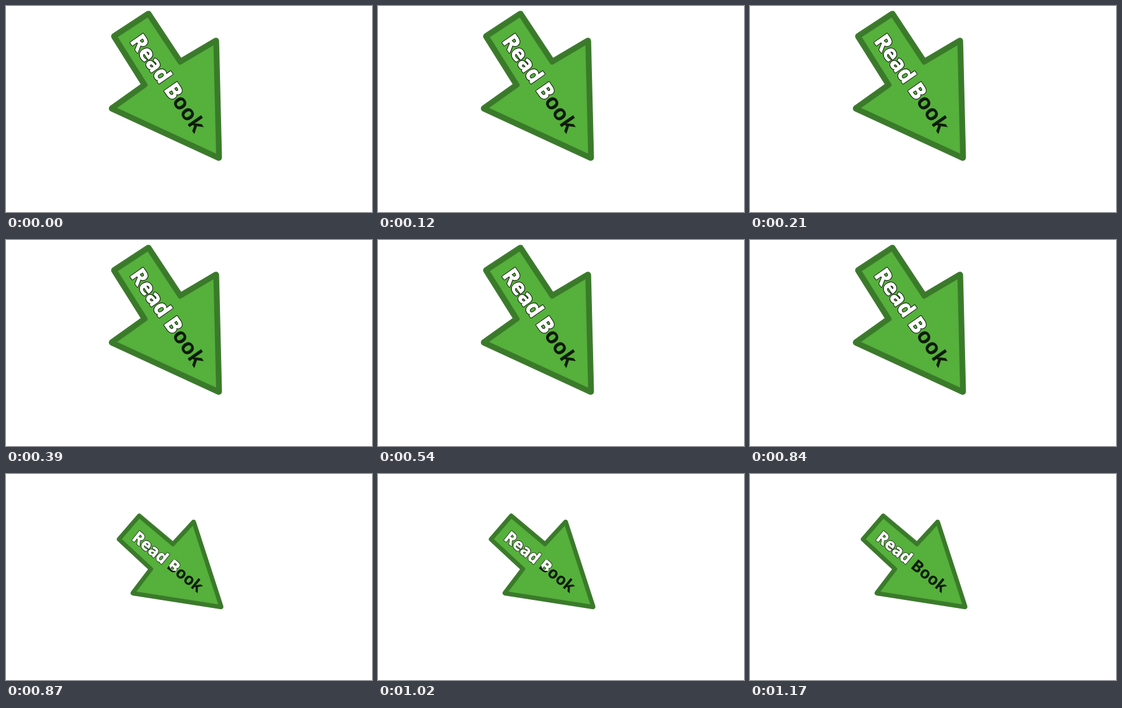
These frames come from a looping animation (640x360 px, 1.41 s). An HTML page with a canvas:

```html
<!DOCTYPE html>
<html lang="en">
<head>
<meta charset="utf-8">
<title>Read Book</title>
<style>
  html, body { margin: 0; height: 100%; overflow: hidden; background: #fff; }
  canvas { display: block; }
</style>
</head>
<body>
<canvas id="stage" width="640" height="360"></canvas>
<script>
const LOOP = 1410, SHRINK = 870, CLEAR = 1170;
const ctx = document.getElementById('stage').getContext('2d');
ctx.lineJoin = 'round';

const large = {
  outline: [[249, 14], [304.5, 98], [367, 61], [372, 265], [185.5, 179], [243, 138], [189.5, 53]],
  border: 8, x: 272.6, y: 142.5, angle: 55, size: 37.6
};
const small = {
  outline: [[233, 73.5], [292, 123], [328, 84], [376, 232], [222, 208], [254, 166], [198, 114]],
  border: 6, x: 277, y: 161.2, angle: 39, size: 28.4
};

function arrow({ outline, border }) {
  const path = new Path2D();
  for (const [x, y] of outline) path.lineTo(x, y);
  path.closePath();
  const edge = (width, color) => {
    ctx.lineWidth = width;
    ctx.strokeStyle = color;
    ctx.stroke(path);
  };
  edge(border * 1.4, '#2f6422');
  ctx.fillStyle = '#56b03c';
  ctx.fill(path);
  edge(border * 1.18, '#439030');
  edge(border, '#3a7a2a');
}

function whiteText(text, x, size) {
  ctx.lineWidth = size * 0.09;
  ctx.strokeStyle = '#10200c';
  ctx.strokeText(text, x, 0);
  ctx.lineWidth = size * 0.03;
  ctx.strokeStyle = ctx.fillStyle = '#fff';
  ctx.strokeText(text, x, 0);
  ctx.fillText(text, x, 0);
}

// "white" is the painted prefix; "partial" is painted only inside a small disc.
function label({ x, y, angle, size }, white, partial) {
  ctx.save();
  ctx.translate(x, y);
  ctx.rotate(angle * Math.PI / 180);
  ctx.font = `bold ${size}px "Open Sans", sans-serif`;
  const left = -ctx.measureText('Read Book').width / 2;
  const next = left + ctx.measureText(white).width;
  ctx.fillStyle = '#0e1c0a';
  ctx.fillText('Read Book'.slice(white.length), next, 0);
  whiteText(white, left, size);
  if (partial) {
    ctx.beginPath();
    ctx.arc(next + size * 0.36, -size * 0.46, size * 0.35, 0, 7);
    ctx.clip();
    whiteText(partial, next, size);
  }
  ctx.restore();
}

function draw(t) {
  const pose = t < SHRINK ? large : small;
  ctx.fillStyle = '#fff';
  ctx.fillRect(0, 0, 640, 360);
  arrow(pose);
  if (t < SHRINK) label(pose, 'Read B');
  else label(pose, 'Read ', t < CLEAR ? 'B' : '');
}

const start = performance.now();
function tick() {
  draw((performance.now() - start) % LOOP);
  requestAnimationFrame(tick);
}
tick();
</script>
</body>
</html>
```
